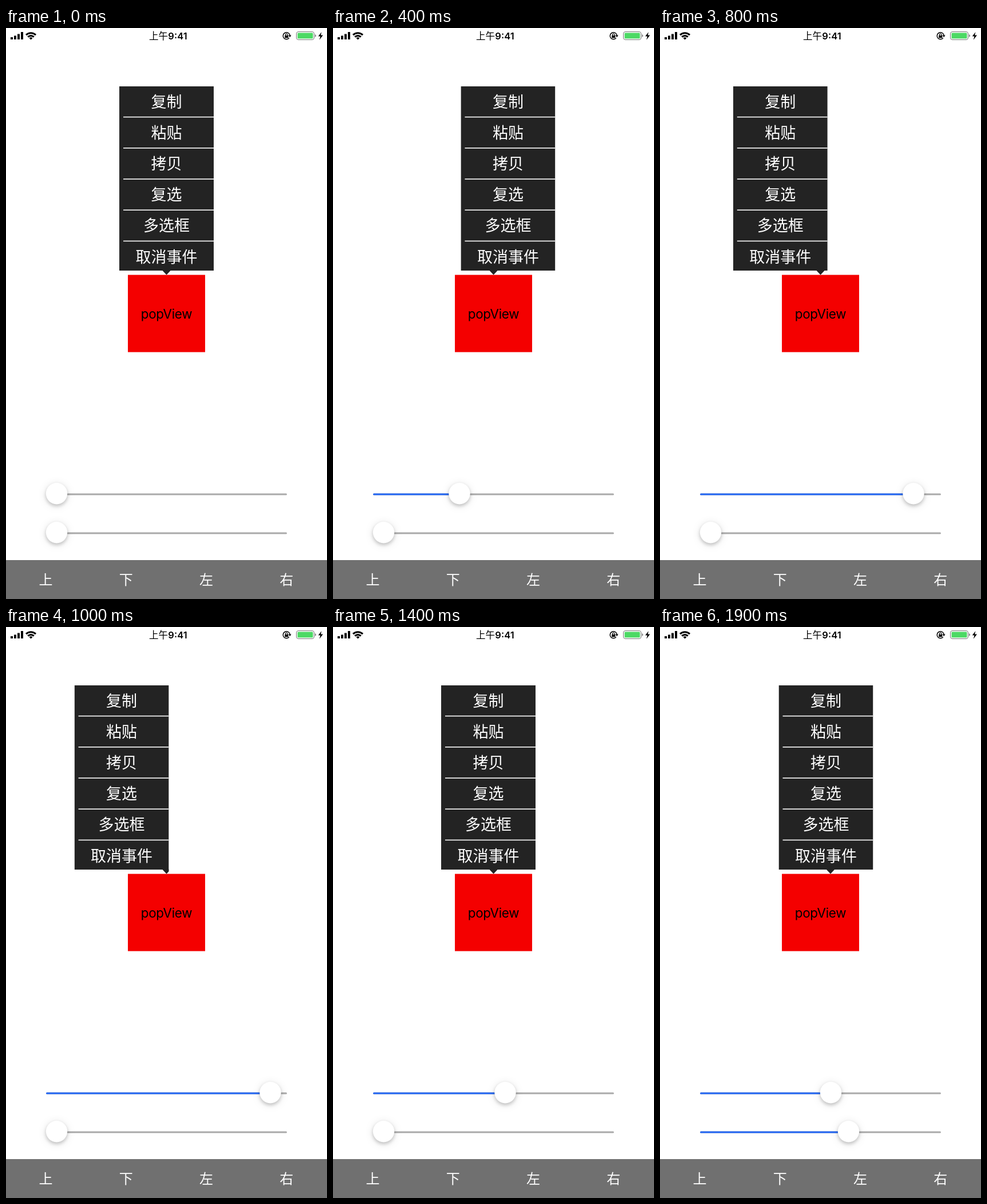
An HTML page that plays this animation: 561x998 px, repeating every 2000 ms.

```html
<!DOCTYPE html>
<html lang="zh-CN">
<head>
<meta charset="utf-8">
<title>popView</title>
<style>
  html, body { margin: 0; width: 100%; height: 100%; overflow: hidden; background: #fff; }
  svg { display: block; width: 561px; height: 998px; }
  text { text-anchor: middle; font-family: "Noto Sans CJK SC", "Noto Sans CJK", "Noto Sans", sans-serif; }
  .menu { font-size: 27px; font-weight: 300; fill: #fff; }
  .tab { font-size: 24px; font-weight: 300; fill: #fff; }
  .latin { font-family: Inter, sans-serif; }
  .knob { fill: #fff; filter: drop-shadow(0 3px 3px #0003) drop-shadow(0 2px 7px #0000001c); }
  .line { fill: none; stroke: #000; }
</style>
</head>
<body>
<svg viewBox="0 0 561 998">
  <g id="status">
    <path d="M8 16h4v4h-4zM14 13.5h4v6.5h-4zM20 10.5h4v9.5h-4zM26 7h4v13h-4z"/>
    <g class="line" stroke-width="3">
      <path d="M35 12.2A12.3 12.3 0 0 1 52 12.2"/>
      <path d="M38.2 15.6A7.6 7.6 0 0 1 48.8 15.6"/>
    </g>
    <path d="M43.5 20.6l-2.9-2.9a4.2 4.2 0 0 1 5.8 0z"/>
    <text x="266.5" y="20" font-size="16.5" font-weight="500">上午</text>
    <text class="latin" x="300" y="20" font-size="16.5" font-weight="600">9:41</text>
    <path class="line" stroke-width="1.5" d="M494.8 17.6A6 6 0 1 1 496.1 12.5"/>
    <path d="M493.6 12.6h5l-2.5 3.6z"/>
    <path d="M487.2 13h6.2v4.4h-6.2z"/>
    <path class="line" stroke-width="1.2" d="M488.5 13v-1.2a1.8 1.8 0 0 1 3.6 0v1.2"/>
    <rect x="507.5" y="6.5" width="31" height="14" rx="3.5" fill="none" stroke="#777"/>
    <rect x="509.5" y="8.5" width="27" height="10" rx="1.5" fill="#4cd964"/>
    <path d="M540 11a2.6 2.6 0 0 1 0 5z" fill="#777"/>
    <path d="M551.5 7l-5.8 7.6h3.7l-1.6 6.2 6.2-8.2h-3.9z"/>
  </g>

  <rect x="213" y="431.5" width="135" height="135" fill="#f40000"/>
  <text class="latin" x="280.5" y="508" font-size="22.4" letter-spacing="-.3">popView</text>

  <clipPath id="bounds"><rect y="102" width="165" height="330"/></clipPath>
  <g id="menu" clip-path="url(#bounds)">
    <rect y="102" width="165" height="322" fill="#232323"/>
    <path id="arrow" d="M-7.5 423.5h15l-7.5 8z" fill="#232323"/>
  </g>

  <g id="sliders"></g>
  <rect y="930" width="561" height="68" fill="#707070"/>
  <g id="tabs"></g>
</svg>
<script>
const $ = id => document.getElementById(id);
const add = (parent, tag, attrs, text = '') => {
  const node = document.createElementNS('http://www.w3.org/2000/svg', tag);
  for (const key in attrs) node.setAttribute(key, attrs[key]);
  node.textContent = text;
  return parent.appendChild(node);
};

const MENU_WIDTH = 165, BOX_LEFT = 213, BOX_WIDTH = 135;
const KNOB_MIN = 88.5, KNOB_RANGE = 383;
const LOOP = 2000, STEP = 100;

['复制', '粘贴', '拷贝', '复选', '多选框', '取消事件'].forEach((label, i) => {
  const y = 101 + i * 54.2;
  if (i) add($('menu'), 'rect', { x: 7, y: y - .4, width: 158, height: 1.6, fill: '#fff' });
  add($('menu'), 'text', { class: 'menu', x: MENU_WIDTH / 2, y: y + 37.5 }, label);
});

[...'上下左右'].forEach((label, i) =>
  add($('tabs'), 'text', { class: 'tab', x: 69.6 + i * 140.2, y: 973 }, label));

const makeSlider = y => {
  add($('sliders'), 'rect', { x: 70, y: y - 1.5, width: 421, height: 3, rx: 1.5, fill: '#aaa' });
  const fill = add($('sliders'), 'rect', { x: 70, y: y - 1.5, width: 0, height: 3, rx: 1.5, fill: '#2468f6' });
  const knob = add($('sliders'), 'circle', { class: 'knob', cy: y - 1.3, r: 18.7 });
  return x => {
    fill.setAttribute('width', x - 70);
    knob.setAttribute('cx', x);
  };
};
const setAnchor = makeSlider(815), setArrow = makeSlider(883);

// Drag paths as [time, knob x]
const anchorDrag = [[100, KNOB_MIN], [200, 125], [400, 221], [600, 350], [800, 443],
  [1000, 462], [1200, 357], [1300, 320], [1400, 301], [1500, 298.5]];
const arrowDrag = [[1500, KNOB_MIN], [1600, 95], [1700, 126], [1800, 270], [1900, 329.5]];

const knobAt = (path, t) => {
  const next = path.findIndex(key => key[0] > t);
  if (next === 0) return path[0][1];
  if (next < 0) return path[path.length - 1][1];
  const [t0, x0] = path[next - 1], [t1, x1] = path[next];
  return x0 + (x1 - x0) * (t - t0) / (t1 - t0);
};

// An untouched slider leaves the popup centred
const ratio = x => x === KNOB_MIN ? .5 : (x - KNOB_MIN) / KNOB_RANGE;

function draw(now) {
  const t = Math.floor(now % LOOP / STEP) * STEP;
  const anchorX = knobAt(anchorDrag, t), arrowX = knobAt(arrowDrag, t);
  const offset = ratio(anchorX) * MENU_WIDTH;
  const tip = BOX_LEFT + ratio(arrowX) * BOX_WIDTH;
  setAnchor(anchorX);
  setArrow(arrowX);
  $('menu').setAttribute('transform', `translate(${tip - offset})`);
  $('arrow').setAttribute('transform', `translate(${offset})`);
  requestAnimationFrame(() => draw(performance.now()));
}
draw(performance.now());
</script>
</body>
</html>
```
